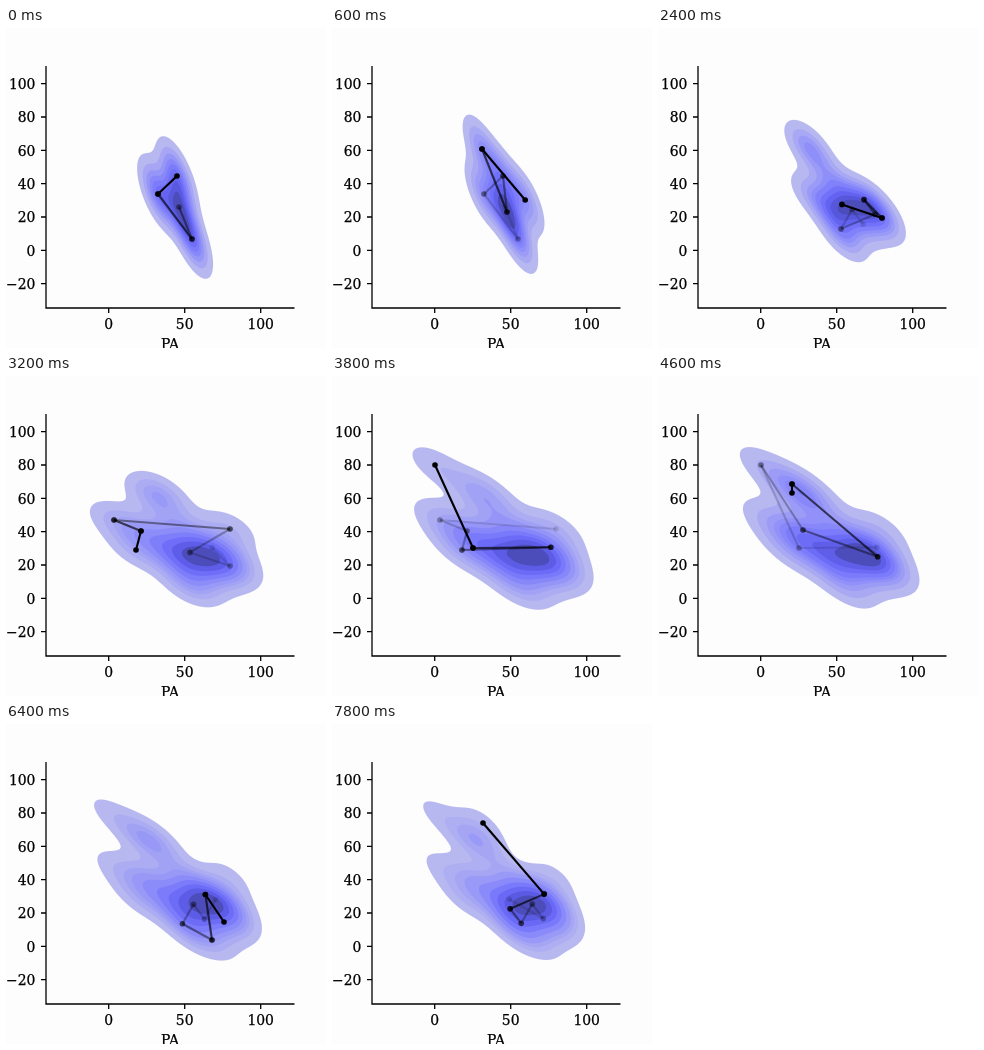
These frames come from a looping animation (320 px wide and 320 px high, 8000 ms). An HTML page with a canvas:

```html
<!DOCTYPE html>
<html lang="en">
<head>
<meta charset="utf-8">
<style>
  html, body { margin: 0; width: 100%; height: 100%; overflow: hidden; background: #fdfdfd; }
  canvas, svg { position: absolute; left: 0; top: 0; width: 320px; height: 320px; }
  text { font: 13.9px "DejaVu Serif", serif; fill: #000; stroke: #000; stroke-width: 0.25px; }
  path { stroke: #000; stroke-width: 1.3; fill: none; }
</style>
</head>
<body>
<canvas id="plot" width="320" height="320"></canvas>
<svg id="axes" viewBox="0 0 320 320"></svg>
<script>
const STEP = 200, STEPS = 40, START = 4, TRAIL = 6, FADE = 0.66;
const AREA = { x: 40, y: 38, w: 249, h: 242 };
const BACK = [253, 253, 253];
const THRESHOLD = 0.07, LEVELS = 10;

// Runs of samples away from the main cluster, keyed by the index of their first sample
const excursions = {
  0: [[173, 179], [186, 211], [152, 166], [171, 148], [175, 184], [150, 121]],
  7: [[152, 117]],
  14: [[224, 190]],
  16: [[224, 153], [108, 144], [135, 155], [130, 174]],
  21: [[141, 172], [103, 89], [145, 154]],
  25: [[134, 108], [134, 117]],
  33: [[206, 216]],
  35: [[218, 198]],
  42: [[151, 99]]
};

// The main cluster is an evenly spread low-discrepancy sequence
const clusterPoint = i => [
  175 + 45 * ((0.875 + i * 0.7549) % 1),
  168 + 34 * ((0.7 + i * 0.5698) % 1)
];

const samples = Array.from({ length: START + STEPS - 1 }, (_, i) => clusterPoint(i));
for (const [start, run] of Object.entries(excursions)) {
  run.forEach((point, i) => { samples[+start + i] = point; });
}

const ctx = document.getElementById("plot").getContext("2d");
const clamp = v => Math.max(0, Math.min(1, v));
const mix = (a, b, t) => a.map((v, i) => v + (b[i] - v) * t);

// Pale lavender through bright blue to dusky blue
function rampColor(t) {
  const low = 184 - 108 * t;
  return [low, low, 240 + 24 * t - 78 * t ** 6];
}

// Gaussian kernel density with Scott's bandwidth
function density(points) {
  const n = points.length;
  const mean = k => points.reduce((s, p) => s + p[k], 0) / n;
  const m = [mean(0), mean(1)];
  const scale = n ** (-1 / 3);
  const cov = (a, b) =>
    scale * points.reduce((s, p) => s + (p[a] - m[a]) * (p[b] - m[b]), 0) / (n - 1);
  const xx = cov(0, 0), xy = cov(0, 1), yy = cov(1, 1);
  const det = xx * yy - xy * xy;
  const a = yy / det / 2, b = xy / det, c = xx / det / 2;
  const field = new Float64Array(AREA.w * AREA.h);
  for (const [px, py] of points) {
    for (let j = 0, i = 0; j < AREA.h; j++) {
      const dy = AREA.y + j + 0.5 - py;
      for (let k = 0; k < AREA.w; k++, i++) {
        const dx = AREA.x + k + 0.5 - px;
        const q = a * dx * dx - b * dx * dy + c * dy * dy;
        if (q < 16) field[i] += Math.exp(-q);
      }
    }
  }
  return field;
}

// Density levels below which fixed shares of the total mass lie
function massLevels(field) {
  const sorted = Float64Array.from(field).sort();
  const total = sorted.reduce((s, v) => s + v, 0);
  const levels = [];
  let sum = 0;
  for (const v of sorted) {
    sum += v;
    while (levels.length < LEVELS - 1 &&
           sum >= total * (THRESHOLD + (1 - THRESHOLD) * levels.length / (LEVELS - 1))) {
      levels.push(v);
    }
  }
  levels.push(sorted[sorted.length - 1]);
  return levels;
}

function drawDensity(points) {
  const { x, y, w, h } = AREA;
  const field = density(points);
  const levels = massLevels(field);
  const mids = levels.slice(1).map((v, i) => (v + levels[i]) / 2);
  const span = mids[mids.length - 1] - mids[0];
  const colors = mids.map(v => rampColor((v - mids[0]) / span));
  const image = ctx.createImageData(w, h);
  const at = i => field[i] || 0;
  for (let i = 0; i < field.length; i++) {
    const slope = Math.hypot(at(i + 1) - at(i - 1), at(i + w) - at(i - w)) / 2 + 1e-12;
    let color = BACK;
    for (let k = 0; k < colors.length; k++) {
      const cover = clamp((field[i] - levels[k]) / slope + 0.5);
      if (!cover) break;
      color = mix(color, colors[k], cover);
    }
    image.data.set([...color, 255], i * 4);
  }
  ctx.putImageData(image, x, y);
}

function drawTrail(points) {
  const last = points.length - 1;
  ctx.lineWidth = 2.1;
  for (let age = Math.min(TRAIL, last) - 1; age >= 0; age--) {
    const ends = [points[last - age - 1], points[last - age]];
    ctx.globalAlpha = FADE ** age;
    ctx.beginPath();
    ends.forEach(p => ctx.lineTo(...p));
    ctx.stroke();
    for (const [px, py] of ends) {
      ctx.beginPath();
      ctx.arc(px, py, 2.8, 0, 2 * Math.PI);
      ctx.fill();
    }
  }
  ctx.globalAlpha = 1;
}

function drawAxes() {
  let d = "M40 38V280H288.5", labels = "";
  const label = (x, y, anchor, value) => {
    labels += `<text x="${x}" y="${y}" text-anchor="${anchor}">${String(value).replace("-", "\u2212")}</text>`;
  };
  for (let v = -20; v <= 100; v += 20) {
    const y = 222.3 - v * 1.666;
    d += `M40 ${y}h-5`;
    label(29.4, y + 5.2, "end", v);
  }
  for (let v = 0; v <= 100; v += 50) {
    const x = 102.7 + v * 1.52;
    d += `M${x} 280v5`;
    label(x, 301, "middle", v);
  }
  label(164, 321, "middle", "PA");
  document.getElementById("axes").innerHTML = `<path d="${d}"/>` + labels;
}

let shown = -1;
function tick() {
  const step = Math.floor(performance.now() / STEP) % STEPS;
  if (step !== shown) {
    shown = step;
    const points = samples.slice(0, START + step);
    ctx.clearRect(0, 0, 320, 320);
    drawDensity(points);
    drawTrail(points);
  }
  requestAnimationFrame(tick);
}

drawAxes();
tick();
</script>
</body>
</html>
```
